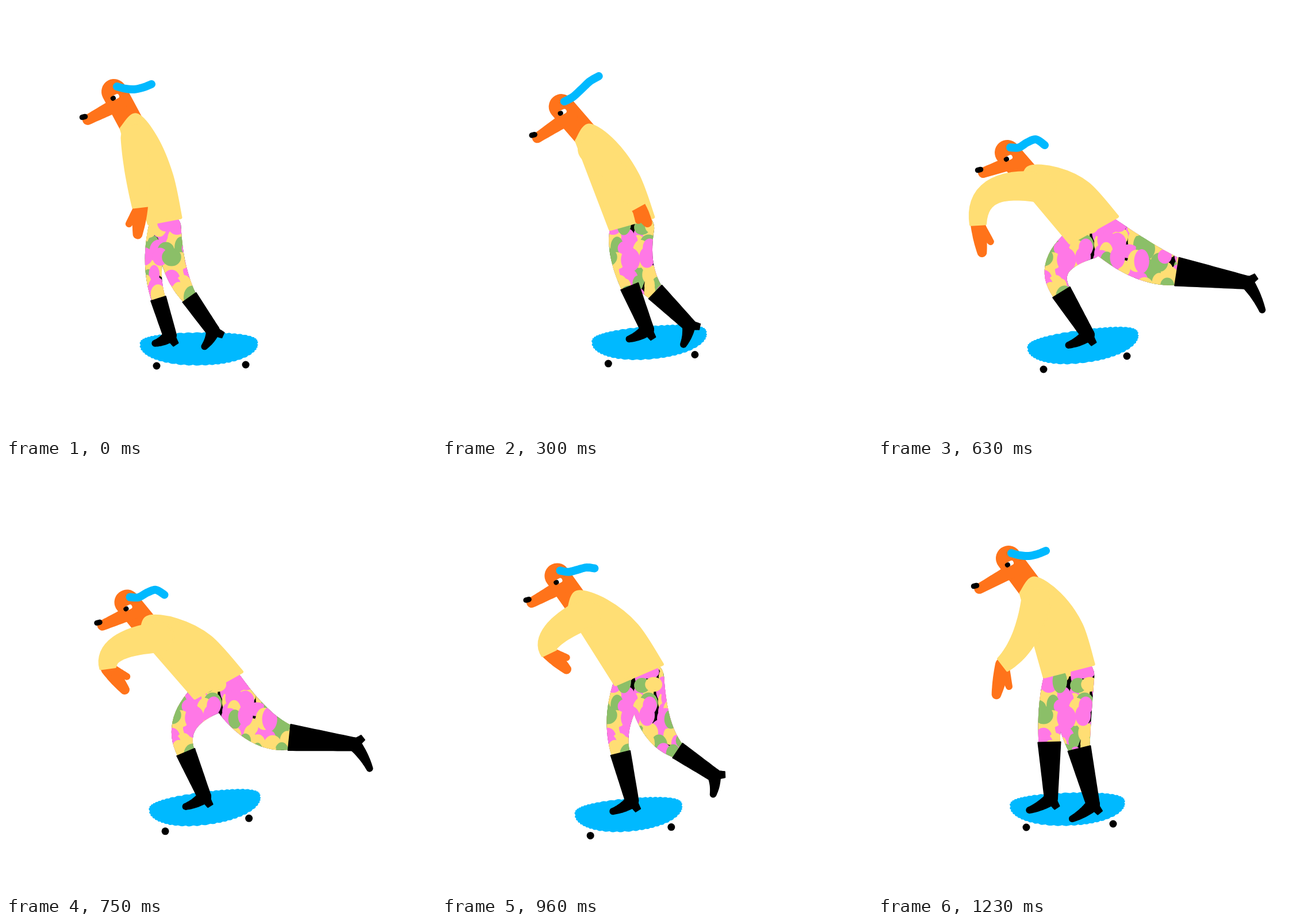
Recreate the animation shown at these times as an HTML page. Size 748 px wide and 748 px high, loop 1.26 s.

```html
<!DOCTYPE html>
<html lang="en">
<head>
<meta charset="utf-8">
<title>Skating dog</title>
<style>
  html, body { margin: 0; width: 100%; height: 100%; overflow: hidden; background: #fff; }
  svg { display: block; width: 100vw; height: 100vh; }
</style>
</head>
<body>
<svg id="stage" viewBox="0 0 748 748">
  <defs><clipPath id="pants"></clipPath></defs>
</svg>
<script>
const LOOP = 1260, STEP = 30, DEG = Math.PI / 180;
const ORANGE = '#ff731a', BLUE = '#00b9ff', YELLOW = '#ffde74',
      PINK = '#ff78e6', GREEN = '#8bbf68', BLACK = '#000';

// Key joints of the skeleton; all outlines are derived from them.
const BODY_TIMES = [0, 150, 450, 630, 870, 1080, 1230];
const ARM_TIMES = [0, 150, 280, 450, 510, 630, 870, 1080, 1230];
const SKULL = [[188,149], [202,155], [213,206], [225,255], [196,215], [212,172], [227,164]];
const NOSE = [[135,193], [149,198], [167,259], [176,285], [145,258], [158,213], [169,212]];
const NECK = [[218,205], [235,212], [260,243], [263,299], [230,260], [243,220], [265,215]];
const HEM = [[276,373,28], [278,379,34], [380,376,43], [375,389,47], [360,375,46], [322,357,42], [332,359,44]];
// left wheel, right wheel
const WHEELS = [[262,626,417,624], [285,624,437,612], [291,621,441,604], [288,632,433,609],
                [264,644,410,625], [254,648,389,637], [258,632,409,626]];
// boot top, ankle
const FRONT = [[265,509,285,573], [295,494,308,562], [344,485,391,564], [319,498,365,572],
               [310,503,332,584], [311,502,329,588], [298,484,301,582]];
const BACK = [[319,507,360,565], [327,484,379,541], [439,511,506,568], [520,462,642,481],
              [446,493,538,503], [369,502,398,590], [350,495,374,592]];
// elbow, wrist, finger tip
const ARM = [[228,285,234,349,229,397], [275,300,289,366,291,399], [308,298,342,348,360,376],
             [308,343,267,366,221,393], [200,300,118,309,65,318], [199,324,174,380,181,429],
             [195,311,180,329,217,357], [196,280,199,328,216,358], [253,305,217,349,206,401]];

const svg = document.getElementById('stage');
const clip = document.getElementById('pants');

function add(parent, tag, attrs) {
  const el = document.createElementNS('http://www.w3.org/2000/svg', tag);
  for (const k in attrs) el.setAttribute(k, attrs[k]);
  return parent.appendChild(el);
}
const fill = (color, line = 0) => add(svg, 'path',
  { fill: color, stroke: color, 'stroke-width': line, 'stroke-linejoin': 'round' });
const brush = (color, width) => add(svg, 'path',
  { fill: 'none', stroke: color, 'stroke-width': width, 'stroke-linecap': 'round' });
const draw = (el, d) => el.setAttribute('d', d);

// Monotone cubic through the poses: eases at turning points, never overshoots.
function pose(rows, t, times = BODY_TIMES) {
  const last = times.length - 1;
  let i = 0;
  while (i < last - 1 && t >= times[i + 1]) i++;
  const h = times[i + 1] - times[i], u = (t - times[i]) / h, v = 1 - u;
  return rows[0].map((_, k) => {
    const rate = j => (rows[j + 1][k] - rows[j][k]) / (times[j + 1] - times[j]);
    const slope = j => {
      const a = rate(Math.max(j - 1, 0)), b = rate(Math.min(j, last - 1));
      return a * b <= 0 ? 0 : 2 * a * b / (a + b);
    };
    return rows[i][k] * v * v * (1 + 2 * u) + rows[i + 1][k] * u * u * (3 - 2 * u)
      + h * u * v * (slope(i) * v - slope(i + 1) * u);
  });
}

const mix = (a, b, u) => a.map((v, i) => v + (b[i] - v) * u);
const move = (p, x, y) => [p[0] + x, p[1] + y];
const polar = (p, angle, r) => move(p, r * Math.cos(angle), r * Math.sin(angle));
const angle = (a, b) => Math.atan2(b[1] - a[1], b[0] - a[0]);
const dist = (a, b) => Math.hypot(b[0] - a[0], b[1] - a[1]);
const xy = p => p[0].toFixed(1) + ' ' + p[1].toFixed(1);
const line = (...pts) => 'M' + pts.map(xy).join('L');
// Control point of the curve that passes through m halfway.
const through = (a, m, b) => m.map((v, i) => 2 * v - (a[i] + b[i]) / 2);

function spline(pts) {
  let d = 'M' + xy(pts[0]);
  for (let i = 0; i < pts.length - 1; i++) {
    const a = pts[i - 1] || pts[i], b = pts[i], c = pts[i + 1], e = pts[i + 2] || c;
    d += 'C' + [mix(b, move(b, c[0] - a[0], c[1] - a[1]), 1 / 6),
                mix(c, move(c, b[0] - e[0], b[1] - e[1]), 1 / 6), c].map(xy).join(' ');
  }
  return d;
}

// Tapered tube from a to b, bent towards c; points are [x, y, radius].
function tube(a, c, b, roundStart, roundEnd) {
  const left = [], right = [], n = 16;
  for (let i = 0; i <= n; i++) {
    const u = i / n, p = mix(a, c, u), q = mix(c, b, u), m = mix(p, q, u), dir = angle(p, q);
    left.push(polar(m, dir - Math.PI / 2, m[2]));
    right.unshift(polar(m, dir + Math.PI / 2, m[2]));
  }
  const cap = (r, on, to) => (on ? `A${r} ${r} 0 0 1 ` : 'L') + xy(to);
  return line(...left) + cap(b[2], roundEnd, right[0])
    + 'L' + right.map(xy).join('L') + cap(a[2], roundStart, left[0]) + 'Z';
}
const taper = (a, b, roundStart, roundEnd) => tube(a, mix(a, b, .5), b, roundStart, roundEnd);

// Camouflage cloth that stays in place while the legs move across it.
function weave() {
  let seed = 7;
  const rnd = () => (seed = seed * 16807 % 2147483647) / 2147483647;
  const cloth = add(svg, 'g', { 'clip-path': 'url(#pants)' });
  add(cloth, 'rect', { x: 100, y: 250, width: 560, height: 400, fill: BLACK });
  const dyes = [YELLOW, PINK, GREEN, YELLOW, PINK];
  for (let i = 0; i < 240; i++) {
    const col = i * 7 % 16, row = Math.floor(i / 16) * 4 % 15;
    add(cloth, 'ellipse', {
      cx: 236 + col * 20 + rnd() * 14, cy: 330 + row * 15 + rnd() * 12,
      rx: 9 + rnd() * 8, ry: 12 + rnd() * 9,
      fill: dyes[Math.floor(rnd() * dyes.length)]
    });
  }
}

const board = fill(BLUE);
const wheels = [0, 1].map(() => add(svg, 'circle', { r: 6.5, fill: BLACK }));
weave();
const makeLeg = () => ({ trouser: add(clip, 'path', {}), boot: [0, 1, 2].map(() => fill(BLACK, 2)) });
const frontLeg = makeLeg(), backLeg = makeLeg();
const neck = brush(ORANGE, 44), snout = fill(ORANGE);
const nose = brush(BLACK, 9.5), white = brush('#fff', 8), pupil = brush(BLACK, 8);
const ear = brush(BLUE, 14);
const torso = fill(YELLOW, 6);
const palm = fill(ORANGE), thumb = fill(ORANGE), sleeve = fill(YELLOW, 4);

// Scalloped deck hung between the two wheels.
function drawBoard(t) {
  const [ax, ay, bx, by] = pose(WHEELS, t);
  const a = [ax, ay], b = [bx, by], tilt = angle(a, b) * .85, half = dist(a, b) * .655;
  const mid = move(mix(a, b, .5), -4, -36), rim = [], n = 288;
  for (let i = 0; i < n; i++) {
    const q = i / n * 2 * Math.PI, c = Math.cos(q), s = Math.sin(q);
    const bump = 1.6 * Math.abs(Math.sin(q * 26 + Math.sin(q * 5)));
    const x = Math.sign(c) * Math.abs(c) ** .92 * half + c * bump;
    const y = (s > 0 ? s * 35 : -((-s) ** .6) * 20) + s * bump;
    rim.push(polar(polar(mid, tilt, x), tilt + Math.PI / 2, y));
  }
  draw(board, line(...rim) + 'Z');
  [a, b].forEach((p, i) => {
    wheels[i].setAttribute('cx', p[0]);
    wheels[i].setAttribute('cy', p[1]);
  });
}

// The thigh runs smoothly into the boot; boot sizes follow the shaft length.
function drawLeg({ trouser, boot }, rows, t, hip, plump, footAngle) {
  const [tx, ty, ax, ay] = pose(rows, t);
  const top = [tx, ty], ankle = [ax, ay], shin = angle(top, ankle), size = dist(top, ankle);
  const r = size * .2, knee = polar(top, shin, -60), foot = footAngle(shin);
  draw(trouser, tube(hip, [...knee, plump * (hip[2] + r) / 2], [...top, r - 1], true, true));
  draw(boot[0], taper([...top, r], [...ankle, 11], false, true));
  const toe = polar(ankle, foot, size * .44);
  const arch = polar(mix(ankle, toe, .5), foot - Math.PI / 2, 4);
  draw(boot[1], tube([...ankle, 11], [...arch, 8], [...toe, 5], true, true));
  draw(boot[2], taper([...ankle, 8], [...polar(ankle, foot - 95 * DEG, 19), 5], true, false));
}

function drawHead(t, base) {
  const skull = pose(SKULL, t), tip = pose(NOSE, t), eye = move(skull, 1, 10);
  draw(neck, line(skull, base));
  draw(snout, taper([...mix(skull, base, .35), 13], [...move(tip, 7, 5), 9], true, true));
  draw(nose, line(move(tip, -2.5, .6), move(tip, 2.5, -.6)));
  draw(white, line(eye, move(eye, 4, -2)));
  draw(pupil, line(move(eye, -3.2, 1.8), move(eye, -2, 1.2)));

  // The ear ripples once per loop and flies up as the head drops.
  const beat = Math.cos(2 * Math.PI * t / LOOP);
  const lift = t > 150 && t < 450 ? 40 * Math.sin((t - 150) / 300 * Math.PI) ** 2 : 0;
  const strand = [0, .25, .5, .75, 1].map(u => move(skull, 5 + 60 * u,
    -9 - (4 + lift) * u + 7 * beat * Math.sin(Math.PI * u) + 3 * (1 - beat) * Math.sin(2 * Math.PI * u)));
  draw(ear, spline(strand));
}

function drawTorso(base, hem, axis, half, tilt) {
  const len = dist(base, hem);
  const at = (along, out) => polar(polar(base, axis, along), axis - Math.PI / 2, out);
  const back = [at(2, -19), at(-12, 13), at(len * .2, 17 + half * .55), at(len * .6, half + 9), polar(hem, tilt, half)];
  draw(torso, spline(back) + 'L' + xy(polar(hem, tilt, -half)) + 'Z');
}

function drawArm(t, shoulder) {
  const [ex, ey, wx, wy, fx, fy] = pose(ARM, t, ARM_TIMES);
  const wrist = [wx, wy, 13], tip = [fx, fy, 8.5];
  const turn = t < 540 ? 28 : -28;
  const side = polar(wrist, angle(wrist, tip) + turn * DEG, dist(wrist, tip) * .75);
  draw(palm, tube(wrist, [...mix(wrist, tip, .5).slice(0, 2), 13], tip, true, true));
  draw(thumb, taper([...wrist.slice(0, 2), 11], [...side, 6], true, true));
  const a = [...shoulder, 25], b = [wx, wy, 13];
  draw(sleeve, tube(a, through(a, [ex, ey, 20], b), b, true, false));
}

function render(now) {
  const t = Math.floor(now % LOOP / STEP) * STEP;
  const base = pose(NECK, t), [hx, hy, half] = pose(HEM, t), hem = [hx, hy];
  const axis = angle(base, hem), tilt = (axis - Math.PI / 2) * .57;
  const hip = side => [...move(polar(hem, tilt, side * half * .3), 0, 12), half * .72];
  drawBoard(t);
  drawLeg(frontLeg, FRONT, t, hip(-1), .8, () => 152 * DEG);
  drawLeg(backLeg, BACK, t, hip(1), 1.35, shin => 50 * DEG + 1.25 * shin);
  drawHead(t, base);
  drawTorso(base, hem, axis, half, tilt);
  drawArm(t, polar(base, axis, 26));
}

function tick() {
  render(performance.now());
  requestAnimationFrame(tick);
}
tick();
</script>
</body>
</html>
```
